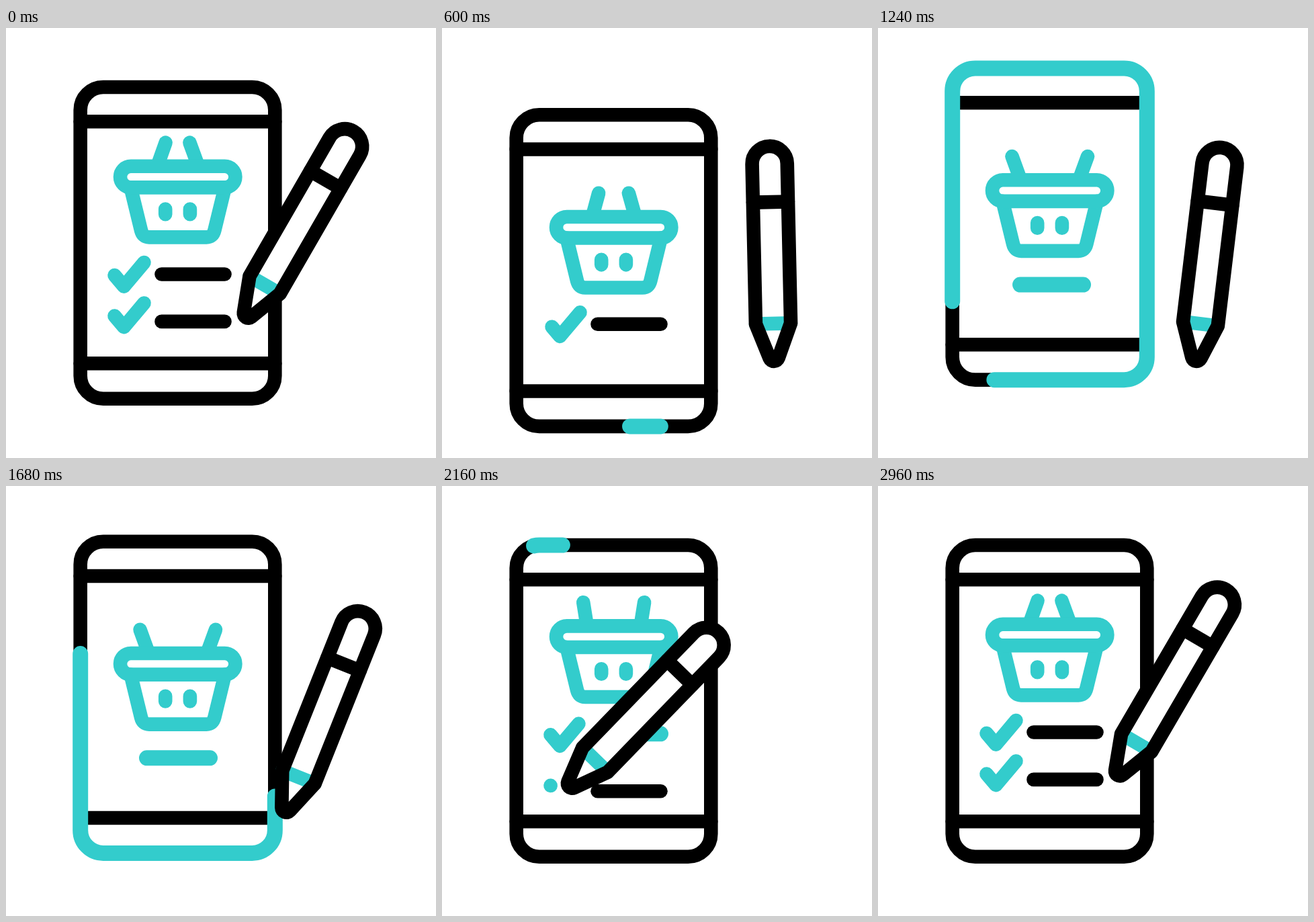
An HTML page with a canvas that plays this animation: 640x640 px, repeating every 3 s.

```html
<!DOCTYPE html>
<html lang="en">
<head>
<meta charset="utf-8">
<title>Shopping list</title>
<style>
  html, body { margin: 0; width: 100%; height: 100%; overflow: hidden; background: #fff; }
  canvas { display: block; }
</style>
</head>
<body>
<canvas id="stage" width="640" height="640"></canvas>
<script>
const ctx = document.getElementById('stage').getContext('2d');
const LOOP = 3000, STEP = 40;
const BLACK = '#000', TEAL = '#33cccc', THIN = 20.6, THICK = 23;
let time = 0;

// Eased 0 to 1 between two times, with curve handles at (x1, 0) and (x2, 1).
function ease(begin, end, x1 = 1 / 3, x2 = 2 / 3) {
  const x = (time - begin) / (end - begin);
  if (x <= 0) return 0;
  if (x >= 1) return 1;
  let low = 0, high = 1;
  for (let i = 0; i < 24; i++) {
    const s = (low + high) / 2, r = 1 - s;
    if (3 * r * r * s * x1 + 3 * r * s * s * x2 + s ** 3 < x) low = s; else high = s;
  }
  return low * low * (3 - 2 * low);
}

const mix = (a, b, amount) => a + (b - a) * amount;

const phone = new Path2D('M366.3 551.7H144.7A34 34 0 0 1 110.7 517.7V122A34 34 0 0 1 144.7 88'
  + 'H366.3A34 34 0 0 1 400.3 122V517.7A34 34 0 0 1 366.3 551.7Z');
const phoneLength = 2 * (221.6 + 395.7) + 2 * Math.PI * 34;
const bars = new Path2D('M110.7 139.3H400.3M110.7 499.3H400.3');
const rim = new Path2D('M185.8 205.8H325.6A15.8 15.8 0 0 1 325.6 237.4H185.8A15.8 15.8 0 0 1 185.8 205.8Z');
const bowl = new Path2D('M185.5 237.4L201 301Q203.5 311.4 213 311.4H298.4Q307.9 311.4 310.4 301L325.9 237.4');
const eyes = new Path2D('M237.2 269.6V277.2M273.9 269.6V277.2');
// Open paths count one unit longer, so that dashes never restart at their end.
const check = new Path2D('M161.5 368L175.5 384.6L205.5 349');
const checkLength = Math.hypot(14, 16.6) + Math.hypot(30, 35.6) + 1;
const line = new Path2D('M231.5 366.5H325.5');
const lineLength = 94 + 1;
// The pencil stands upright with its rounded tip at the origin.
const pencil = new Path2D('M-26.1 -287A26.1 26.1 0 0 1 26.1 -287V-49L6.5 2.5A7 7 0 0 1 -6.5 2.5L-26.1 -49Z');
const pencilBand = new Path2D('M-26 -230H26');
const pencilCollar = new Path2D('M-26 -49H26');

function stroke(path, color, width = THIN) {
  ctx.strokeStyle = color;
  ctx.lineWidth = width;
  ctx.stroke(path);
}

function strokePart(path, length, from, to, color, width) {
  if (to <= from) return;
  if (to - from < 1) {
    const part = (to - from) * length;
    ctx.setLineDash([part, length - part]);
    ctx.lineDashOffset = -from * length;
  }
  stroke(path, color, width);
  ctx.setLineDash([]);
}

function moved(x, y, draw) {
  ctx.save();
  ctx.translate(x, y);
  draw();
  ctx.restore();
}

function drawPhone() {
  stroke(bars, BLACK);
  stroke(phone, BLACK);
  const turn = (.46 * time - 235) / phoneLength;
  const tail = ease(1156, 2361, .333, .41), head = ease(497, 1539, .333, .42);
  strokePart(phone, phoneLength, turn + tail, turn + head, TEAL, THICK);
}

function drawBasket() {
  const open = ease(482, 1037) - ease(1966, 2520);
  const handles = new Path2D();
  handles.moveTo(mix(237.6, 199.5, open), 170.6);
  handles.lineTo(mix(225.4, 212, open), 205);
  handles.moveTo(mix(273.4, 312, open), 170.6);
  handles.lineTo(mix(286, 299.4, open), 205);
  for (const path of [handles, bowl, rim, eyes]) stroke(path, TEAL);
}

function drawErasable(path, length, color, erased, redrawn) {
  strokePart(path, length, erased, 1, color);
  strokePart(path, length, 0, redrawn, color);
}

function drawFirstRow() {
  drawErasable(check, checkLength, TEAL, ease(550, 935), ease(1820, 2220));
  moved(-22 * (ease(922, 1314) - ease(1720, 2120)), 0, () => {
    stroke(line, BLACK);
    strokePart(line, lineLength, ease(1980, 2420), ease(640, 1130), TEAL, THICK);
  });
}

function drawSecondRow() {
  const erased = ease(150, 500);
  moved(0, 60.5, () => drawErasable(check, checkLength, TEAL, erased, ease(2148, 2500)));
  moved(0, 70.4, () => drawErasable(line, lineLength, BLACK, erased, ease(1800, 2100)));
}

// The pencil swings about a point on its body while that point travels.
function drawPencil() {
  const away = ease(140, 645), back = ease(2260, 2860);
  const write = ease(1240, 2260, .98, .66);
  const x = 435.6 + 56.4 * away - 202 * write + 145.6 * back;
  const y = 295 + 45 * away - 5 * write - 40 * back;
  const tilt = 30 - 32 * away + 50 * ease(645, 2230, .46, 1) - 18 * ease(2480, 3000);
  moved(x, y, () => {
    ctx.rotate(tilt * Math.PI / 180);
    ctx.translate(0, 150);
    ctx.fillStyle = '#fff';
    ctx.fill(pencil);
    stroke(pencilCollar, TEAL);
    stroke(pencilBand, BLACK);
    stroke(pencil, BLACK);
  });
}

function drawFrame() {
  ctx.fillStyle = '#fff';
  ctx.fillRect(0, 0, 640, 640);
  ctx.lineCap = ctx.lineJoin = 'round';
  const phoneY = 46.6 * ease(140, 770, .333, .52) - 77.8 * ease(770, 1300, .53) + 31.2 * ease(1300, 1815);
  const rise = ease(1700, 2235);
  moved(0, phoneY, () => {
    drawPhone();
    moved(0, 48.5 * (ease(140, 863) - rise), drawBasket);
    moved(0, 43.6 * (ease(140, 816) - rise), drawFirstRow);
    moved(0, 43.6 * (ease(140, 700) - ease(1850, 2395)), drawSecondRow);
  });
  drawPencil();
}

const startTime = performance.now();
function tick() {
  time = Math.floor((performance.now() - startTime) % LOOP / STEP) * STEP;
  drawFrame();
  requestAnimationFrame(tick);
}
tick();
</script>
</body>
</html>
```
